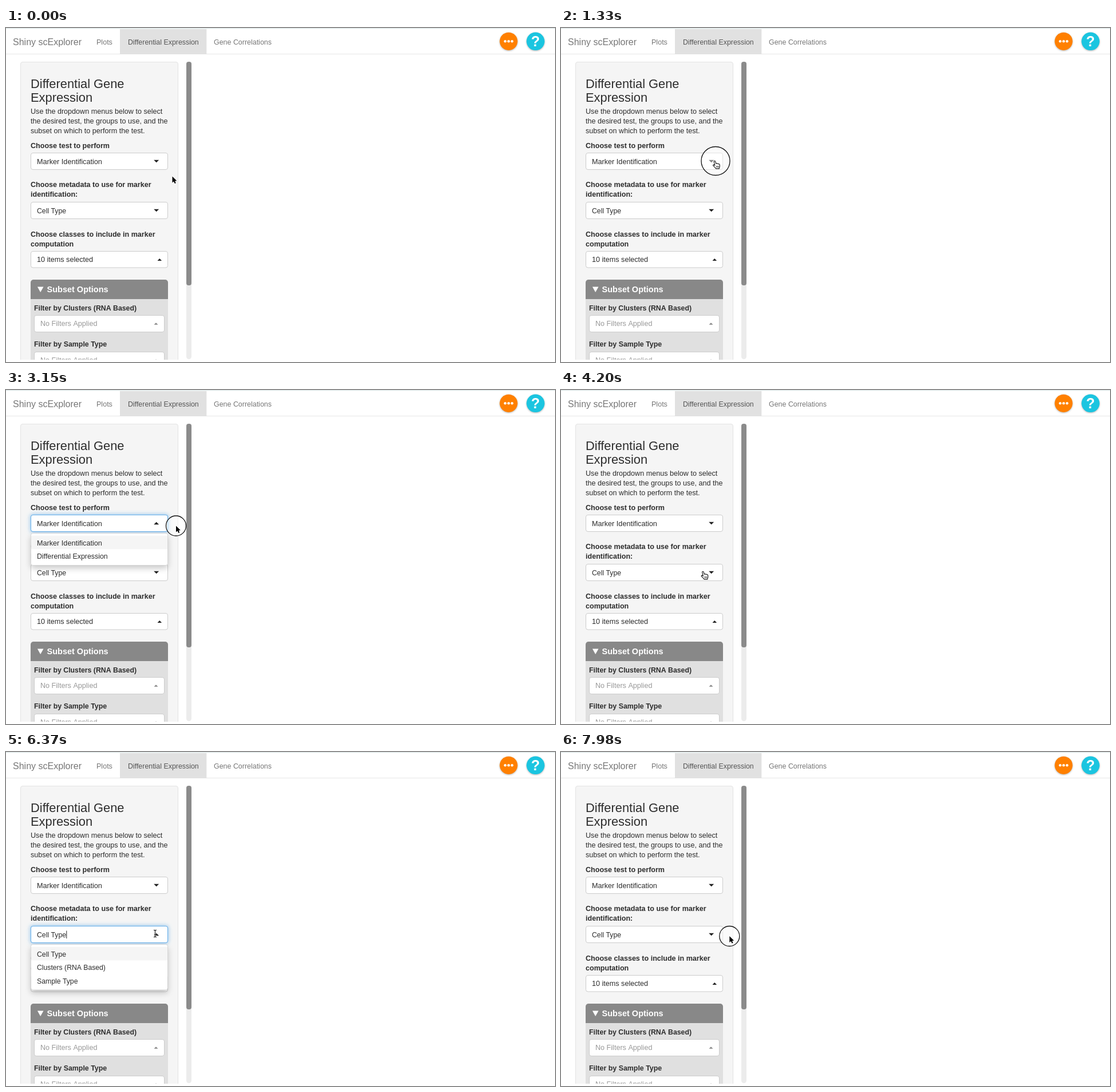
An HTML page with a canvas for the animation above (8 s loop, 959 px wide and 584 px high).

```html
<!DOCTYPE html>
<html lang="en">
<head>
<meta charset="utf-8">
<title>Differential expression panel</title>
<style>
html, body { margin: 0; width: 100%; height: 100%; overflow: hidden; background: #fff; }
canvas { display: block; width: 959px; height: 584px; }
</style>
</head>
<body>
<canvas id="stage"></canvas>
<script>
const W = 959, H = 584, LOOP = 8000, STEP = 70;
const FONT = '"Liberation Sans", Arial, sans-serif';
const canvas = document.getElementById('stage');
const ctx = canvas.getContext('2d');
const dpr = window.devicePixelRatio || 1;
canvas.width = W * dpr;
canvas.height = H * dpr;

const INK = '#2d2d2d';
const FIELD_X = 43, FIELD_W = 240;
const TEST = {
  y: 218, h: 30, value: 'Marker Identification', size: 12.65, caretX: 168,
  items: [['Marker Identification', 12.65], ['Differential Expression', 12.4]]
};
const META = {
  y: 304, h: 30, value: 'Cell Type', size: 12.25, caretX: 105.3,
  items: [['Cell Type', 12.25], ['Clusters (RNA Based)', 12.2], ['Sample Type', 12.25]]
};

// Pointer path: time, x, y
const PATH = [
  [420, 290.5, 259.5], [1190, 270, 232.5],
  [2380, 270, 232.5], [2940, 297, 237.5],
  [3780, 297, 237.5], [4200, 249.5, 317.5], [4550, 259.5, 317.5],
  [6510, 260.5, 317.5], [6580, 260, 317.5],
  [6720, 260, 317.5], [7140, 294, 322.5],
  [7210, 294, 322.5], [7280, 295, 322], [7350, 295, 322], [7420, 294.3, 322]
];

// Click rings: from, to, radius
const RINGS = [
  [1260, 1330, 17.5], [1330, 1400, 25],
  [3150, 3290, 17.5], [5250, 5320, 25], [7910, LOOP, 17.5]
];

const within = (t, a, b) => t >= a && t < b;

function pointerAt(t) {
  if (t <= PATH[0][0]) return { x: PATH[0][1], y: PATH[0][2] };
  for (let i = 1; i < PATH.length; i++) {
    const [t0, x0, y0] = PATH[i - 1], [t1, x1, y1] = PATH[i];
    if (t <= t1) {
      const p = (t - t0) / (t1 - t0), e = p * p * (3 - 2 * p);
      return { x: x0 + (x1 - x0) * e, y: y0 + (y1 - y0) * e };
    }
  }
  const last = PATH[PATH.length - 1];
  return { x: last[1], y: last[2] };
}

function text(str, x, y, size, color = INK, weight = 'normal') {
  ctx.font = `${weight} ${size}px ${FONT}`;
  ctx.fillStyle = color;
  ctx.fillText(str, x, y);
}

const bold = (str, x, y, size = 12.55, color = INK) => text(str, x, y, size, color, 'bold');

function box(x, y, w, h, r, fill, stroke) {
  ctx.beginPath();
  ctx.roundRect(x, y, w, h, r);
  if (fill) { ctx.fillStyle = fill; ctx.fill(); }
  if (stroke) { ctx.strokeStyle = stroke; ctx.lineWidth = 1; ctx.stroke(); }
}

function disc(x, y, r, fill) {
  ctx.beginPath();
  ctx.arc(x, y, r, 0, Math.PI * 2);
  ctx.fillStyle = fill;
  ctx.fill();
}

// Triangle centred on x, y; a negative h points up
function triangle(x, y, w, h, color) {
  ctx.beginPath();
  ctx.moveTo(x - w / 2, y - h / 2);
  ctx.lineTo(x + w / 2, y - h / 2);
  ctx.lineTo(x, y + h / 2);
  ctx.fillStyle = color;
  ctx.fill();
}

function withShadow(color, blur, dy, draw) {
  ctx.save();
  ctx.shadowColor = color;
  ctx.shadowBlur = blur * dpr;
  ctx.shadowOffsetY = dy * dpr;
  draw();
  ctx.restore();
}

function drawNav() {
  ctx.fillStyle = '#dfe9e9';
  ctx.fillRect(0, 0, W, 1.3);
  ctx.fillStyle = '#e7e7e7';
  ctx.fillRect(0, 45, W, 1);
  ctx.fillStyle = '#e1e1e1';
  ctx.fillRect(199, 2, 151.3, 44);
  text('Shiny scExplorer', 12, 30, 16, '#777');
  text('Plots', 158, 29, 12.55, '#777');
  text('Differential Expression', 213, 29, 12.4, '#555');
  text('Gene Correlations', 363, 29, 12.45, '#777');
  withShadow('rgba(0,0,0,.3)', 3, 1, () => {
    disc(878, 23.3, 15.6, '#ff8000');
    disc(925, 23.3, 15.8, '#1bc5e0');
  });
  for (const x of [872, 878, 884]) disc(x, 23.3, 2.3, '#fff');
  ctx.textAlign = 'center';
  bold('?', 925, 32, 25, '#fff');
  ctx.textAlign = 'left';
}

function drawField(f, open, glow) {
  const draw = () => box(FIELD_X + .5, f.y + .5, FIELD_W - 1, f.h - 1, 3.5, '#fff', open ? '#66afe9' : '#ccc');
  if (open) withShadow(`rgba(102,175,233,${.75 * glow})`, 7, 0, draw);
  draw();
  text(f.value, 54, f.y + 20, f.size);
  triangle(262.7, f.y + 15, 9, open ? -4.6 : 4.6, '#222');
}

function drawMenu(f) {
  const top = f.y + 32.5, rowH = 23.5, h = f.items.length * rowH + 9;
  withShadow('rgba(0,0,0,.22)', 11, 5, () => box(FIELD_X + .5, top, FIELD_W - 1, h, 3.5, '#fff'));
  box(FIELD_X + .5, top, FIELD_W - 1, h, 3.5, '#fff', 'rgba(0,0,0,.13)');
  ctx.fillStyle = '#f5f5f5';
  ctx.fillRect(FIELD_X + 1, top + 4.3, FIELD_W - 2, rowH);
  f.items.forEach(([label, size], i) => text(label, 54, top + 21.3 + i * rowH, size));
}

function drawFilter(y) {
  box(49.5, y + .5, 227, 29, 3.5, '#fff', '#ccc');
  text('No Filters Applied', 60, y + 19.3, 12.6, '#999');
  triangle(262, y + 15, 7, -3.6, '#888');
}

function drawPanel(t) {
  const testOpen = within(t, 1400, 3220), metaOpen = within(t, 5320, 7980);
  ctx.save();
  ctx.beginPath();
  ctx.rect(0, 47, 330, 533);
  ctx.clip();
  box(25.5, 59.5, 275, 560, 3.5, '#f5f5f5', '#e3e3e3');
  text('Differential Gene', 43, 105, 21.85);
  text('Expression', 43, 128.5, 21.85);
  ['Use the dropdown menus below to select',
    'the desired test, the groups to use, and the',
    'subset on which to perform the test.'].forEach((s, i) => text(s, 43, 150.3 + i * 17, 12.6));
  bold('Choose test to perform', 43, 210);
  bold('Choose metadata to use for marker', 43, 278.3);
  bold('identification:', 43, 295.3);
  bold('Choose classes to include in marker', 43, 364.7);
  bold('computation', 43, 381.7);

  box(43.5, 390.5, 239, 28.5, 3.5, '#fff', '#ccc');
  text('10 items selected', 54, 409.3, 12.6);
  triangle(268.3, 405, 7.6, -3.8, '#222');

  box(43, 440, 240, 34, [5, 5, 0, 0], '#888');
  triangle(60.2, 457.2, 10.6, 9.6, '#fff');
  bold('Subset Options', 71.5, 462, 14.5, '#fff');
  ctx.fillStyle = '#e0e0e0';
  ctx.fillRect(43, 474, 240, 106);
  bold('Filter by Clusters (RNA Based)', 49, 493.7, 12.3);
  drawFilter(502);
  bold('Filter by Sample Type', 49, 557.3, 12.4);
  drawFilter(566);

  drawField(TEST, testOpen, t < 1470 ? .5 : 1);
  drawField(META, metaOpen, t < 5390 ? .5 : 1);
  if (testOpen) drawMenu(TEST);
  if (metaOpen) drawMenu(META);
  ctx.fillStyle = '#222';
  if (within(t, 1400, 1890) || within(t, 2450, 2940)) ctx.fillRect(TEST.caretX, TEST.y + 8.5, 1, 13);
  if (within(t, 5320, 5880) || within(t, 6370, 6860) || within(t, 7420, 7910)) {
    ctx.fillRect(META.caretX, META.y + 8.5, 1, 13.5);
  }
  ctx.restore();

  box(315, 59, 9, 520, 4.5, '#ececec');
  box(315, 59, 9, 391, 4, '#8b8b8b');
  return testOpen || metaOpen;
}

const ARROW = new Path2D('M0 0V11L2.6 8.7L4.3 12.6L6.2 11.8L4.6 8L7.8 7.8Z');
const HAND = new Path2D('M-2.8 1.2C-3 -.6 -.6 -.6 -.2 1L.8 4.6Q2.2 3.6 3 4.9Q4.4 4 5.2 5.4' +
  'Q7 4.9 7.2 7L7.3 9.5Q7.2 11 6.4 12V13.4H.6Q-1 11 -3.8 8.6Q-5 7 -3.4 6.6Q-2.4 6.6 -1.2 7.8Z');
const FINGERS = new Path2D('M1.6 8.4V11.4M3.4 8.4V11.4M5.2 8.4V11.4');
const BEAM = new Path2D('M-2.5 -6.2Q0 -6.2 0 -4.8Q0 -6.2 2.5 -6.2M0 -5V5M-2.5 6.2Q0 6.2 0 4.8Q0 6.2 2.5 6.2M-1.5 1.5H1.5');

function stroke(path, color, width) {
  ctx.strokeStyle = color;
  ctx.lineWidth = width;
  ctx.stroke(path);
}

function drawPointer(t, open) {
  const { x, y } = pointerAt(t);
  const ring = RINGS.find(([a, b]) => within(t, a, b));
  if (ring) {
    disc(x, y, ring[2], 'rgba(255,255,255,.45)');
    ctx.strokeStyle = '#111';
    ctx.lineWidth = 1.3;
    ctx.stroke();
  }
  const over = [TEST, META].some(f => x > FIELD_X && x < FIELD_X + FIELD_W && y > f.y && y < f.y + f.h);
  ctx.save();
  ctx.translate(x, y);
  ctx.lineJoin = 'round';
  if (over && open) {
    stroke(BEAM, '#fff', 2.4);
    stroke(BEAM, '#111', 1.1);
  } else if (over) {
    ctx.fillStyle = '#fff';
    ctx.fill(HAND);
    stroke(HAND, '#111', 1.1);
    stroke(FINGERS, '#111', .8);
  } else {
    stroke(ARROW, '#fff', 1.8);
    ctx.fillStyle = '#000';
    ctx.fill(ARROW);
  }
  ctx.restore();
}

function render(now) {
  const t = Math.floor((now % LOOP) / STEP) * STEP;
  ctx.setTransform(dpr, 0, 0, dpr, 0, 0);
  ctx.fillStyle = '#fff';
  ctx.fillRect(0, 0, W, H);
  drawNav();
  const open = drawPanel(t);
  drawPointer(t, open);
}

const start = performance.now();
function tick() {
  render(performance.now() - start);
  requestAnimationFrame(tick);
}
tick();
</script>
</body>
</html>
```
